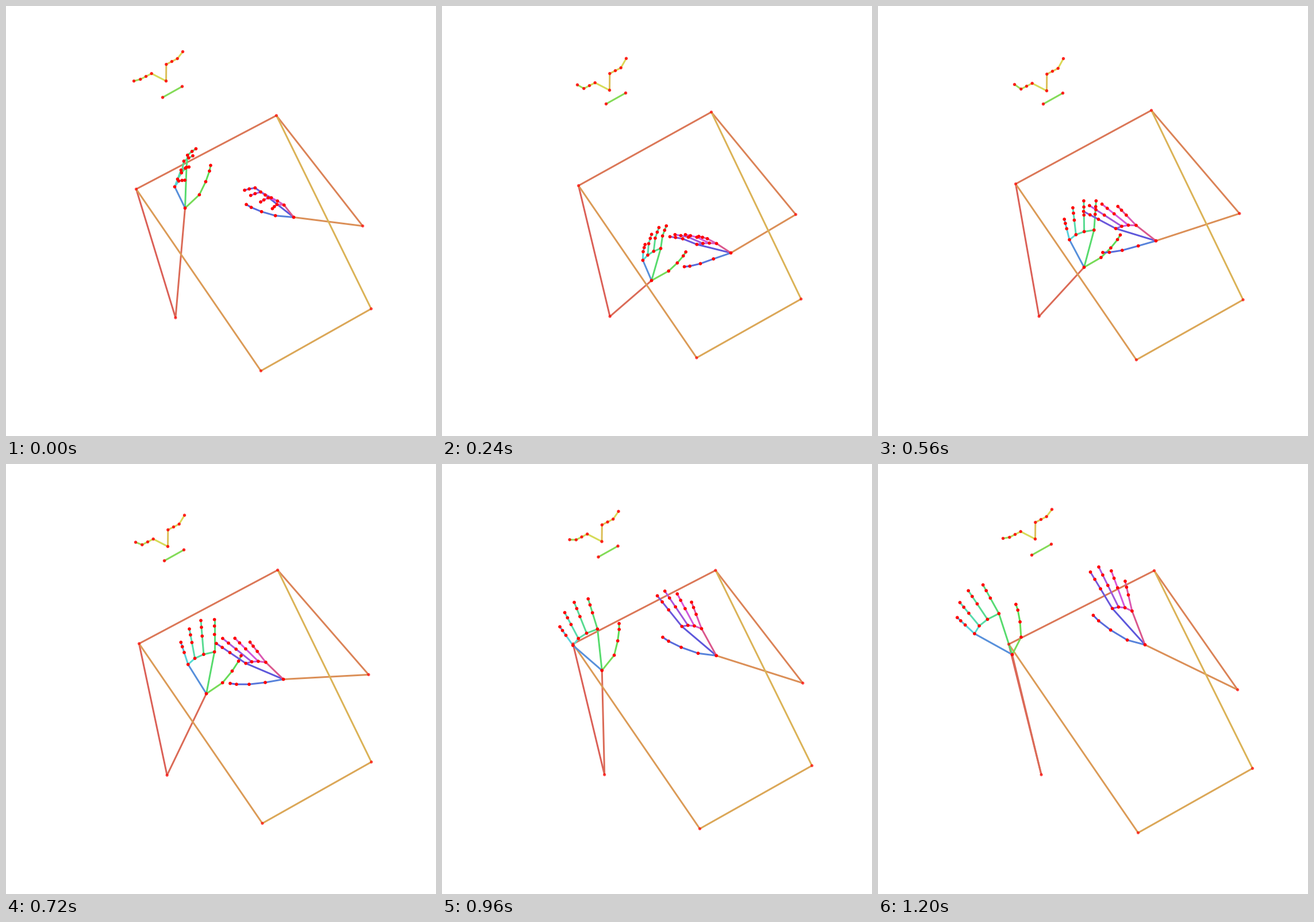
Animation, 748 px wide and 748 px high, one loop 1280 ms. Source, as a matplotlib script:

```python
import colorsys

import matplotlib.pyplot as plt
import numpy as np
from matplotlib.animation import FuncAnimation
from matplotlib.collections import LineCollection

SIZE, DPI = 748, 100
FRAMES, INTERVAL = 16, 80
PX = 72 / DPI
KEYS = [0, 3, 7, 9, 11, 13, 15]

# Positions are complex (x + y*1j, y down); angles are degrees clockwise from up.
SHOULDER = [226+318j, 237+312j, 239+309j, 231+312j, 228+312j, 227+313j, 227+313j]
ZOOM = [.964, .913, .933, .953, .964, .996, 1]
UPPER_ARM_LEFT = [163, 166.5, 170, 168, 167, 166, 166]
UPPER_ARM_RIGHT = [142, 140.5, 139.5, 139, 140, 144.5, 145]
NOSE_KEYS = [0, 1] + KEYS[1:]
NOSE = [278+130j, 276+125j, 291+146j, 293+147j, 281+143j, 278+140j, 277+129j, 273+130j]
NOD = [0, .85, 1, .67, .5, .1, .1]
SPREAD = [.58, .66, .81, .81, .84, 1, 1]

# side is the turn from the palm towards the thumb; the rest are proportions.
LEFT_HAND = dict(
    side=1, knuckle_angle=43, width=1.0, finger=.76, thumb_angle=18,
    thumb_base=(34, 45), thumb=.77,
    wrist=[311+351j, 364+477j, 358+454j, 348+399j, 314+377j, 243+341j, 233+331j],
    turn=[2, 16, 15, 11, 5, -17, -18],
    palm=[71, 58, 67, 74, 73, 72, 75])
RIGHT_HAND = dict(
    side=-1, knuckle_angle=21, width=.74, finger=.87, thumb_angle=-9,
    thumb_base=(32, 33), thumb=.86,
    wrist=[500+367j, 502+429j, 483+408j, 482+374j, 483+357j, 470+310j, 464+314j],
    turn=[-52, -76, -73, -67, -59, -41, -42],
    palm=[63, 61, 73, 71, 72, 85, 85])

BODY_EDGES = [(0, 2), (2, 4), (0, 1), (1, 3), (3, 5), (0, 6), (6, 7), (7, 1)]
FACE_EDGES = ([(i, i + 1) for i in range(4, 8)]
              + [(i, i - 1) for i in range(4, 0, -1)] + [(9, 10)])


def hand_edges():
    """Fingers in turn, joined across the knuckles, and the palm's outer edge."""
    edges = []
    for root in range(1, 18, 4):
        edges.append((0 if root < 9 else root - 4, root))
        edges += [(i, i + 1) for i in range(root, root + 3)]
    return edges + [(0, 17)]


def track(keys, frame, times=KEYS):
    """Softened cubic motion through the keys."""
    times, keys = np.array(times, float), np.array(keys)
    slopes = 0.5 * np.gradient(keys, times)
    i = min(np.searchsorted(times, frame, side="right") - 1, len(times) - 2)
    step = times[i + 1] - times[i]
    u = (frame - times[i]) / step
    ease = u * u * (3 - 2 * u)
    return (keys[i] + ease * (keys[i + 1] - keys[i])
            + step * u * (1 - u) ** 2 * slopes[i]
            - step * u * u * (1 - u) * slopes[i + 1])


def polar(length, angle):
    return -1j * length * np.exp(1j * np.radians(angle))


def body_points(frame):
    zoom = track(ZOOM, frame)
    left = track(SHOULDER, frame)
    right = left + 253 * zoom - 128j
    hip = left + zoom * (225 + 328j)
    return [left, right,
            left + polar(234, track(UPPER_ARM_LEFT, frame)),
            right + polar(253 * zoom, track(UPPER_ARM_RIGHT, frame)),
            track(LEFT_HAND["wrist"], frame), track(RIGHT_HAND["wrist"], frame),
            hip, hip + zoom * (199 - 112j)]


def face_points(frame):
    nod = track(NOD, frame)
    eyes = [[center + k * (9.7 - 5j) for k in (-1, 0, 1)]
            for center in (-35 - 8j, 10 - 34j)]
    mouth = -6 + (28.5 - 5.5 * nod) * 1j
    face = [-56 - 11j * nod, *eyes[0], 0, *eyes[1],
            29 - (51 + 5 * nod) * 1j, mouth, mouth + 34 - 19j]
    return [track(NOSE, frame, NOSE_KEYS) + p for p in face]


def hand_points(hand, frame):
    side = hand["side"]
    wrist, turn, palm = (track(hand[k], frame) for k in ("wrist", "turn", "palm"))
    grip = max(0, 1 - frame / 4)

    def limb(length, angle):
        return polar(length, turn + side * angle)

    base_length, base_angle = hand["thumb_base"]
    base = wrist + limb(base_length, base_angle)
    thumb = limb(hand["thumb"] * palm, hand["thumb_angle"] + 0.5 * side * turn)
    points = [wrist, base, base + thumb * (0.46 + 0.04j * side),
              base + thumb * (0.82 + 0.03j * side), base + thumb]

    index = limb(palm, 0)
    little = limb(palm * hand["width"] * track(SPREAD, frame),
                  -hand["knuckle_angle"] * (1 - 0.35 * grip))
    knuckles = [index, 0.64 * index + 0.43 * little,
                0.31 * index + 0.765 * little, little]
    lean, fan = 36 * grip - 11, 48 * grip - 18
    reach = hand["finger"] * palm * (1 - 0.33 * grip)
    first = limb(reach, lean)
    last = limb(reach * (0.72 - 0.14 * grip), lean + fan)
    curl = -0.22j * side * grip
    for i, size in enumerate((1, 1.17, 1.15, 1)):
        bone = size * (first + (last - first) * i / 3)
        points += [wrist + knuckles[i] + bone * k
                   for k in (0, 0.54 + curl, 0.8 + curl / 2, 1)]
    return points


def skeleton(frame):
    points = np.array(body_points(frame) + face_points(frame)
                      + hand_points(LEFT_HAND, frame) + hand_points(RIGHT_HAND, frame))
    return np.column_stack([points.real, points.imag])


def shifted(edges, start):
    return [(a + start, b + start) for a, b in edges]


edges = np.array(BODY_EDGES + shifted(FACE_EDGES, 8)
                 + shifted(hand_edges(), 19) + shifted(hand_edges(), 40))
hues = np.interp(np.arange(len(edges)), [0, 8, 13, 16, 21, 32, 37, 58],
                 [4, 47, 66, 100, 130, 165, 214, 336])
colors = [colorsys.hls_to_rgb(hue / 360, 0.6, 0.65) for hue in hues]
counts = [8, 11, 42]
diameters = np.repeat([5.2, 5.4, 5.7], counts)
dot_colors = [(1, 0, 0, alpha) for alpha in np.repeat([0.7, 0.85, 1.0], counts)]

fig = plt.figure(figsize=(SIZE / DPI, SIZE / DPI), dpi=DPI, facecolor="white")
ax = fig.add_axes([0, 0, 1, 1])
ax.set(xlim=(-0.5, SIZE - 0.5), ylim=(SIZE - 0.5, -0.5))
ax.axis("off")

joints = skeleton(0)
bones = LineCollection(joints[edges], colors=colors, linewidths=3 * PX, zorder=1)
ax.add_collection(bones)
dots = ax.scatter(*joints.T, s=(diameters * PX) ** 2, c=dot_colors,
                  linewidths=0, zorder=2)


def draw(frame):
    joints = skeleton(frame)
    bones.set_segments(joints[edges])
    dots.set_offsets(joints)
    return bones, dots


anim = FuncAnimation(fig, draw, frames=FRAMES, interval=INTERVAL,
                     init_func=lambda: draw(0), repeat=True, repeat_delay=0)
plt.show()
```
